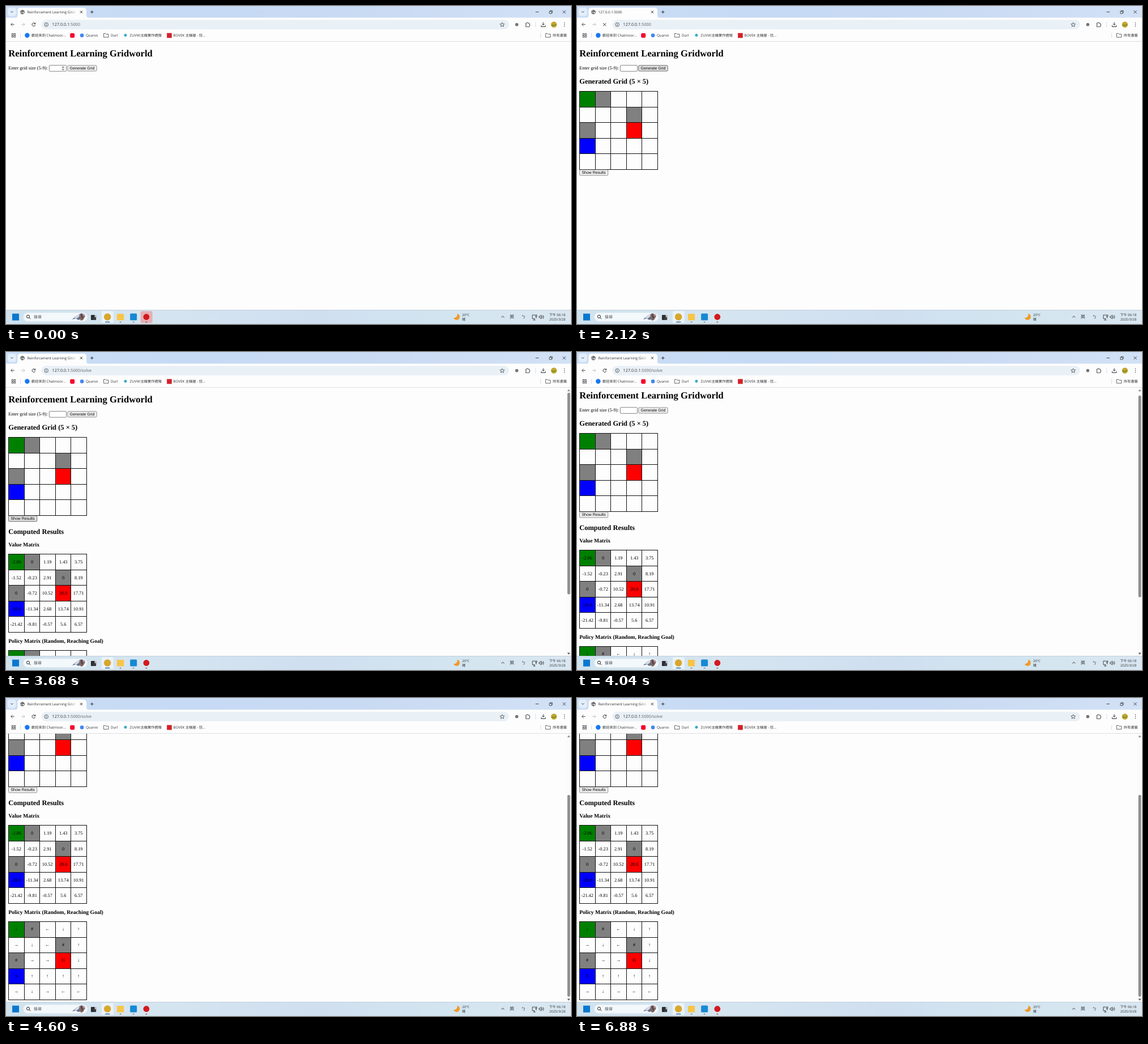
An HTML page for the animation above (7000 ms loop, 998x561 px).

```html
<!DOCTYPE html>
<html lang="zh-Hant">
<head>
<meta charset="utf-8">
<title>Gridworld</title>
<style>
  html, body { margin: 0; width: 100%; height: 100%; overflow: hidden; background: #fdfdfd; }
  svg { display: block; width: 998px; height: 561px; }
  text { font-family: "Open Sans", "Noto Sans CJK TC", "Noto Sans CJK JP", sans-serif; text-rendering: geometricPrecision; white-space: pre; }
  .page text { font-family: "Liberation Serif", serif; fill: #000; }
  .page .button text { font-family: "Liberation Sans", sans-serif; }
  .table rect { shape-rendering: crispEdges; }
  .hover rect { fill: #e2e2e2; stroke: #444; }
</style>
</head>
<body>
<svg id="stage" viewBox="0 0 998 561"></svg>
<script>
const LOOP = 7000, UI = 6.24, INK = '#3c4043';
const PITCH = 27.56;

const text = (x, y, s, size = UI, attrs = '') =>
  `<text x="${x}" y="${y}" font-size="${size}" fill="#303236" ${attrs}>${s}</text>`;
const rect = (x, y, w, h, fill, r = 0, attrs = '') =>
  `<rect x="${x}" y="${y}" width="${w}" height="${h}" rx="${r}" fill="${fill}" ${attrs}/>`;
const circle = (x, y, r, fill, attrs = '') =>
  `<circle cx="${x}" cy="${y}" r="${r}" fill="${fill}" ${attrs}/>`;
const path = (d, stroke = INK, width = 0.9, fill = 'none') =>
  `<path d="${d}" stroke="${stroke}" stroke-width="${width}" fill="${fill}"/>`;
const group = (id, body, cls = '') => `<g id="${id}" class="${cls}">${body}</g>`;
const gradient = (id, stops) => `<linearGradient id="${id}">` + stops.map(([at, color, alpha = 1]) =>
  `<stop offset="${at}" stop-color="${color}" stop-opacity="${alpha}"/>`).join('') + '</linearGradient>';

const button = (id, x, y, w, label) => group(id,
  rect(x + .5, y + .5, w - 1, 10, '#efefef', 1.5, 'stroke="#767676" stroke-width=".8"') +
  text(x + w / 2, y + 7.9, label, 6.93, 'text-anchor="middle"'), 'button');
const heading = (y, s, size) => text(4.2, y, s, size, 'font-weight="bold"');

const CELL_COLORS = { 0: 'green', 1: 'gray', 8: 'gray', 10: 'gray', 13: 'red', 15: 'blue' };
function table(top, values = []) {
  const at = i => Math.round(i * PITCH);
  let out = '';
  for (let i = 0; i < 25; i++) {
    const x = 4 + at(i % 5), y = top + at(i / 5 | 0);
    if (CELL_COLORS[i]) out += rect(x, y, 28, 28, CELL_COLORS[i]);
    if (values[i]) out += text(x + 14.2, y + 16.7, values[i], 8.32, 'text-anchor="middle"');
  }
  for (let i = 0; i < 6; i++)
    out += rect(4 + at(i), top, 1, 139, '#111') + rect(4, top + at(i), 139, 1, '#111');
  return `<g class="table">${out}</g>`;
}

const VALUES = `-2.06 0 1.19 1.43 3.75 -1.52 -0.23 2.91 0 8.19 0 -0.72 10.52 20.0 17.71
  -20.0 -11.34 2.68 13.74 10.91 -21.42 -9.81 -0.57 5.6 6.57`.split(/\s+/);
const POLICY = [...'↓#←↓↑→↓←#↑#→→G↓S↑↑↑↑→↓→←←'];

const page = group('page',
  heading(89.2, 'Reinforcement Learning Gridworld', 16.64) +
  text(4.2, 112.3, 'Enter grid size (5-9):', 8.32) +
  rect(76.4, 104.6, 30.2, 10.6, '#fff', 1.3, 'stroke="#767676" stroke-width=".9"') +
  group('typed', text(78.5, 112.3, '5', 6.93)) +
  group('spinner', rect(97.5, 105.6, 6.5, 8.8, '#efefef') +
    path('M98.7 108.8L100.7 106.4L102.7 108.8ZM98.7 111.2L100.7 113.6L102.7 111.2Z', 'none', 0, '#666')) +
  button('generate', 108.3, 104.3, 52.4, 'Generate Grid') +
  group('grid', heading(136.7, 'Generated Grid (5 × 5)', 12.48) + table(150) +
    button('show', 4, 288.4, 51.2, 'Show Results')) +
  group('results', heading(321, 'Computed Results', 12.48) +
    heading(343.2, 'Value Matrix', 9.73) + table(356, VALUES) +
    heading(512.8, 'Policy Matrix (Random, Reaching Goal)', 9.73) + table(525.6, POLICY)), 'page');

const scrollbar = group('scrollbar', rect(989.5, 63, 8.5, 473, '#fbfbfb') +
  path('M991.4 69.3L994 65.8L996.6 69.3Z', 'none', 0, '#8b8b8b') +
  path('M991.4 530.6L994 534.1L996.6 530.6Z', 'none', 0, '#606060') +
  rect(991.6, 0, 4.9, 356, '#8f8f8f', 2.4, 'id="thumb"'));

const folder = (x, y) => path(`M${x} ${y + 1}v6.2h8.4v-5.4h-4.2l-1.2-1.3h-3z`, INK, .8);

const tabs = rect(0, 0, 998, 22, 'url(#strip)') +
  rect(3, 3, 14.8, 14.8, '#e3eefb', 4.5) + path('M8.4 9.4l2 2l2-2', '#222') +
  path('M16 21Q20.5 21 20.5 16V8Q20.5 3 25.5 3H137Q142 3 142 8V16Q142 21 146.5 21Z', 'none', 0, '#fdfdfd') +
  circle(29, 10.7, 3.4, 'none', `stroke="${INK}" stroke-width=".9"`) +
  path('M26 9.2l2.6 1.2l-.4 1.8l1.6 1.5M29.5 7.4l-.5 1.7l3 1.3', INK, 1.2) +
  text(37.4, 13, '', UI, 'id="title"') + rect(113, 5, 11, 12, 'url(#fade)') + rect(124, 5, 17, 12, '#fdfdfd') +
  path('M131 8.6l4 4m0-4l-4 4', '#222', 1) + path('M149 10.6h5.6m-2.8-2.8v5.6', '#222') +
  path('M935.4 10.5h5.6M983.4 7.9l5.2 5.2m0-5.2l-5.2 5.2', '#222', .8) +
  path('M959.8 9.5h4v3.8h-4zM961 9.3v-1.2h4v3.9h-1', '#222', .7);

const toolbar = rect(0, 20.6, 998, 42, '#fdfdfd') + rect(0, 62, 998, 1, '#dcdfe3') +
  path('M14.8 32.6h-6m2.8-2.9l-2.9 2.9l2.9 2.9') +
  path('M27 32.6h6m-2.8-2.9l2.9 2.9l-2.9 2.9', '#b9bbbe') +
  group('reload', path('M51.4 31.2A2.9 2.9 0 1 0 51.7 33.6M51.8 29.4v2.3h-2.4', '#303236', 1)) +
  group('stop', path('M46.2 30.2l5 5m0-5l-5 5', '#303236', 1)) +
  rect(62.5, 24.6, 826, 16.6, '#e9f0f6', 8.3) +
  circle(71.2, 32.8, 3.3, 'none', `stroke="${INK}" stroke-width=".8"`) +
  path('M71.2 32.3v2.3m0-3.9v.9') +
  text(81.6, 35.3, '<tspan>127.0.0.1</tspan><tspan fill="#5f6368">:5000</tspan><tspan id="route" fill="#5f6368"></tspan>', 7.28) +
  path('M876.5 29l1.1 2.6l2.8.2l-2.1 1.9l.6 2.7l-2.4-1.5l-2.4 1.5l.6-2.7l-2.1-1.9l2.8-.2z', INK, .8) +
  circle(902.2, 32.8, 2.8, '#6f7479') +
  path('M918 30.2h2.2v-1h1.8v1h2.4v2.3h1v1.8h-1v2.4H918v-2.4h.9v-1.8H918z') +
  path('M935.5 28v9.5', '#c9d9ec', .8) +
  path('M949 28.6v5m-2.2-2.1l2.2 2.2l2.2-2.2M945.3 34v2.5h7.4V34', '#303236', 1) +
  circle(967.8, 32.8, 5.2, '#c2a72f') + path('M963.5 33.5q4 2 8.5-1', '#7f8f2a', 2) +
  [29.8, 32.8, 35.8].map(y => circle(986.4, y, .8, INK)).join('');

const apps = [0, 1, 2, 3].map(i =>
  rect(10.2 + i % 2 * 4, 48.6 + (i >> 1) * 4, 2.5, 2.5, 'none', 0, `stroke="${INK}" stroke-width=".8"`)).join('');
const bookmarks = apps + path('M25.5 47.6v8.5M944.5 47.6v8.5', '#c9d9ec', .9) +
  circle(37.4, 51.8, 4.2, '#1877f2') + text(45, 54.2, '歡迎來到 Chatmoor...') +
  rect(113.2, 48, 8, 8, '#f5002f', 2) +
  circle(134.1, 51.9, 3.3, '#4285f4') + text(141, 54.2, 'Quarvo') +
  folder(172.6, 47.9) + text(185, 54.2, 'Durl') +
  circle(211, 51.6, 2.5, '#39a9c9') + text(218.6, 54.2, 'ZUVIK!主機實作週報') +
  rect(284.2, 47.7, 8.6, 8.6, '#d3202a') + text(295.6, 54.2, 'BOVEK 主機屋 - 狂...') +
  folder(953.2, 47.9) + text(965.8, 54.2, '所有書籤');

const bird = path('M117 553q5-6 10-8l6-3q3 0 4 4l-6 7q-5 2-7-2z', 'none', 0, '#66748f') +
  path('M119 550l9-6l4 2l-7 5z', 'none', 0, '#d4d9e4') +
  path('M129 547q3-4 7-4l4 4l-4 7l-4 1z', 'none', 0, '#82665f') +
  path('M133 544l2 7', '#30354a', 1.5) + circle(138, 545, 1.8, '#d8a0a0');

const taskbar = rect(0, 536, 998, 25, 'url(#bar)') + rect(0, 536, 998, .8, '#bccbd8') +
  rect(11, 542.7, 12, 12, '#0a78d0') +
  rect(30.5, 541, 113.5, 15.4, '#f3f8fb', 7.7, 'stroke="#dbe5ec" stroke-width=".6"') +
  circle(39, 547.8, 2.6, 'none', 'stroke="#222" stroke-width="1"') + path('M41 549.8l2.4 2.4', '#222', 1) +
  text(49, 551.1, '搜尋', 6.9, 'fill-opacity=".85"') + bird +
  rect(153, 545, 7, 8, '#b9bcc0', 1) + rect(150, 545, 6.6, 9, '#2b2d30', 1) + rect(154, 549, 5, 5, '#3b3d40', .5) +
  rect(168.8, 538.2, 21, 21, '#f1f7fb', 2.5, 'fill-opacity=".75"') +
  circle(179.2, 548.5, 6.2, '#d9a62c') + rect(175, 556.8, 8.6, 1.4, '#2c6fae', .7) +
  rect(196, 543, 12.2, 11.4, '#f7c547', 1.2) + rect(219.2, 542.6, 12, 12, '#1689d3', 1.5) +
  group('recording', rect(237.6, 538.2, 21, 21, '#e5b0b4', 2.5)) +
  circle(247.9, 548.5, 5.4, '#d3191d') +
  rect(200.6, 556.9, 3.2, 1.3, '#687078', .6) + rect(223.6, 556.9, 3.2, 1.3, '#687078', .6) +
  rect(246.3, 556.9, 3.2, 1.3, '#8b3d40', .6) +
  path('M797 542.8A5.6 5.6 0 1 1 790.6 550.2A6 6 0 0 0 797 542.8Z', 'none', 0, '#f19a28') +
  text(805.8, 547.2, '20°C', 5.9) + text(805.6, 554.7, '晴', 6.1) +
  path('M875 549.5l2.6-2.4l2.6 2.4', '#222', .9) +
  text(889.6, 551.4, '英', 8.2) + text(910.3, 551.2, 'ㄅ', 7.5) +
  path('M934 551.6h-4.2v-6.5h4.5M931 554h4.2M933.4 551.6v2.2M935.3 545h2.3v3h-2.3zM936.4 548v3', '#222', .8) +
  path('M941.8 547.2h1.6l2-1.9v6.6l-2-1.9h-1.6zM947 546.8q1.2 1.8 0 3.6M948.6 545.4q2.3 3.2 0 6.4', '#222', .8) +
  text(988.2, 547.2, '下午 06:18', 6, 'text-anchor="end"') +
  text(988.2, 555.2, '2025/3/28', 6, 'text-anchor="end"');

document.getElementById('stage').innerHTML = '<defs>' +
  gradient('strip', [[0, '#cbddf4'], [.3, '#c6daf5'], [.65, '#c9daf3'], [1, '#d2e1f5']]) +
  gradient('bar', [[0, '#cfe2ee'], [.25, '#d5e5f0'], [.55, '#cfdff0'], [.8, '#d3e5f0'], [1, '#dae7f1']]) +
  gradient('fade', [[0, '#fdfdfd', 0], [1, '#fdfdfd']]) + '</defs>' +
  rect(0, 0, 998, 561, '#fdfdfd') + page + scrollbar + tabs + toolbar + bookmarks + taskbar;

const $ = id => document.getElementById(id);
const show = (id, on) => $(id).style.display = on ? '' : 'none';
const between = (t, a, b) => t >= a && t < b;

function draw(now) {
  const elapsed = now % LOOP, t = elapsed - elapsed % 40;
  const solved = t >= 3480;
  const loading = between(t, 2040, 2160) || between(t, 3440, 3560);
  const u = Math.min(1, Math.max(0, (t - 3997.4) / 309));
  const scroll = 131.8 * u * u * (3 - 2 * u);

  show('recording', t < 240);
  show('typed', between(t, 1160, 2080));
  show('spinner', t < 1720);
  show('grid', t >= 2080);
  show('results', solved);
  show('scrollbar', solved);
  show('reload', !loading);
  show('stop', loading);
  $('generate').classList.toggle('hover', between(t, 1800, 2440));
  $('show').classList.toggle('hover', between(t, 3240, 3720));
  $('title').textContent = !loading ? 'Reinforcement Learning Gridworld'
    : solved ? '127.0.0.1:5000/solve' : '127.0.0.1:5000';
  $('route').textContent = solved ? '/solve' : '';
  $('page').setAttribute('transform', `translate(0 ${-scroll})`);
  $('thumb').setAttribute('y', 71.7 + scroll * .753);
  requestAnimationFrame(draw);
}
requestAnimationFrame(draw);
</script>
</body>
</html>
```
